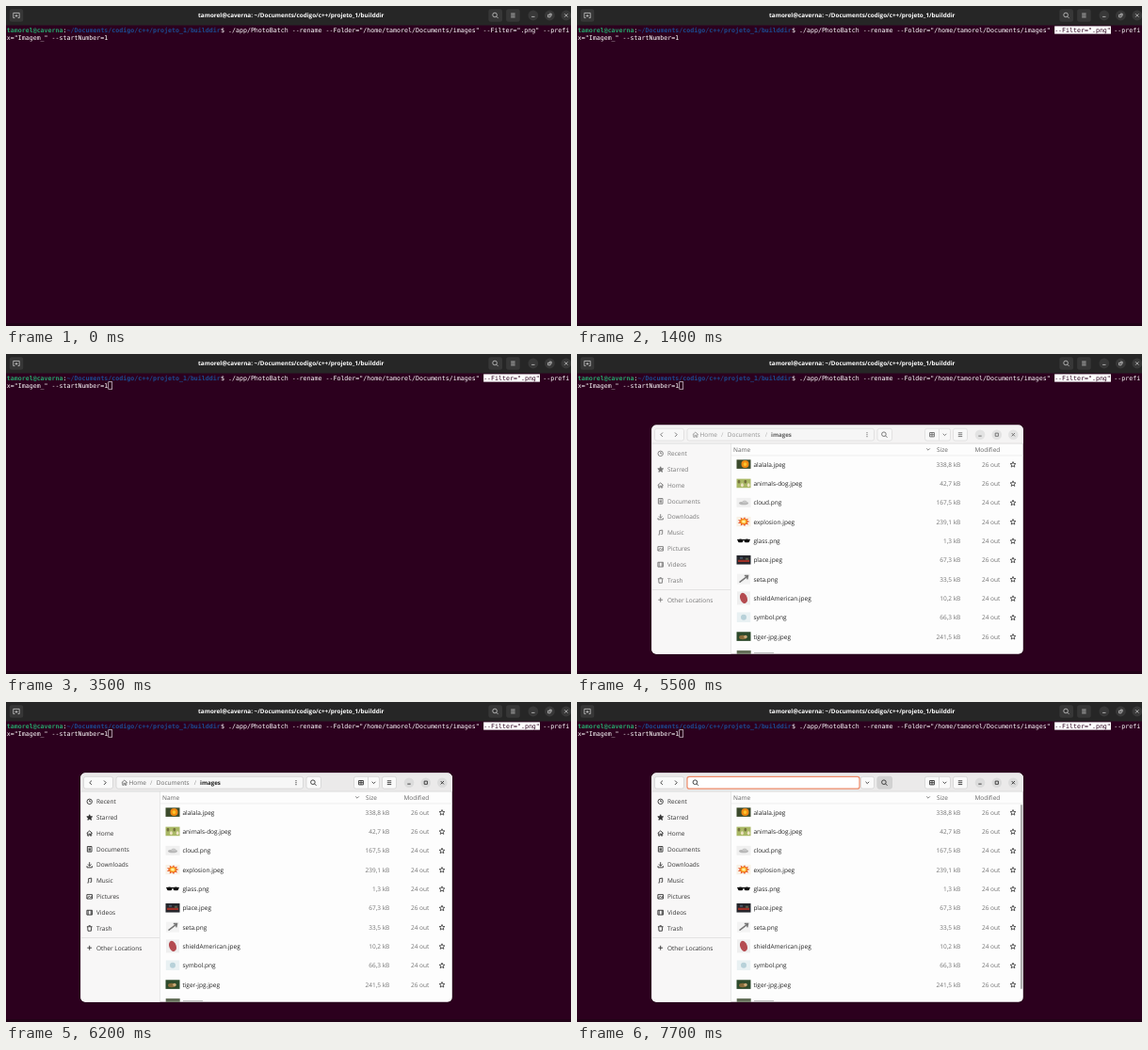
Write an HTML page that moves like this. It is 600x340 px and loops after 8000 ms.

```html
<!DOCTYPE html>
<html lang="pt">
<head>
<meta charset="utf-8">
<title>Terminal</title>
<style>
html, body { margin: 0; width: 100%; height: 100%; overflow: hidden; background: #2c001e; }
svg { display: block; }
text { white-space: pre; text-rendering: geometricPrecision; font: 6.5px "Open Sans", "Noto Sans", sans-serif; }
.mono { font: 6.623px "DejaVu Sans Mono", monospace; }
.bold { font-weight: 700; }
.line { fill: none; stroke: #333; stroke-width: .9; }
.light { stroke: #ddd; stroke-width: .7; }
</style>
</head>
<body>
<svg id="stage" width="600" height="340" viewBox="0 0 600 340"></svg>
<script>
const stage = document.getElementById('stage');
const CELL = 3.987, LEFT = 0.8, ROW = 20.33;
const LINE1 = 27.8, LINE2 = 35.8, PURPLE = '#2c001e';
const prompt = 'tamorel@caverna', cwd = '~/Documents/codigo/c++/projeto_1/builddir';
const flag = '--Filter=".png"';
const command = '$ ./app/PhotoBatch --rename --Folder="/home/tamorel/Documents/images" ';
const flagCol = prompt.length + 1 + cwd.length + command.length;
const col = n => LEFT + n * CELL;

const text = (x, y, s, fill = '#333', more = '') => `<text x="${x}" y="${y}" fill="${fill}" ${more}>${s}</text>`;
const mono = (n, y, s, fill, more = '') => text(col(n), y, s, fill, `class="mono ${more}"`);
const rect = (x, y, w, h, fill, r = 0, more = '') =>
  `<rect x="${x}" y="${y}" width="${w}" height="${h}" rx="${r}" fill="${fill}" ${more}/>`;
const disc = (x, y, r, fill) => `<circle cx="${x}" cy="${y}" r="${r}" fill="${fill}"/>`;
const oval = (x, y, rx, ry, fill) => `<ellipse cx="${x}" cy="${y}" rx="${rx}" ry="${ry}" fill="${fill}"/>`;
const path = (x, y, d, cls = '', more = '') => `<path transform="translate(${x} ${y})" class="line ${cls}" d="${d}" ${more}/>`;
const ring = r => `M${-r} 0a${r} ${r} 0 1 0 ${2 * r} 0a${r} ${r} 0 1 0 ${-2 * r} 0`;

const LENS = 'M-2.9 -.5a2.3 2.3 0 1 0 4.6 0a2.3 2.3 0 1 0 -4.6 0M1.1 1.2L3 3.1';
const MENU = 'M-2.2 -1.9h4.4M-2.2 0h4.4M-2.2 1.9h4.4';
const MIN = 'M-1.7 1.4h3.4', CLOSE = 'M-1.7 -1.7l3.4 3.4M1.7 -1.7l-3.4 3.4';
const MAX = 'M-1.6 -1.6h3.2v3.2h-3.2z', RESTORE = 'M-1.8 -.7h2.5v2.5h-2.5zM-.5 -1.8h2.3v2.3';
const DOWN = 'M-1.8 -.9L0 .9L1.8 -.9';
const STAR = 'M0 -2.9L.8 -.9L2.9 -.8L1.3 .6L1.8 2.7L0 1.5L-1.8 2.7L-1.3 .6L-2.9 -.8L-.8 -.9z';
const HOUSE = 'M-3 0L0 -2.6L3 0M-2 -.6v3.2h1.3v-2h1.4v2H2v-3.2';
const TAB = 'M-1.6 2.6h-1.6v-5.2h6.4v5.2h-1.6M0 -1v2.8M-1.4 .4h2.8';

const winButtons = (xs, y, r, fill, icons, cls = '') =>
  icons.map((d, i) => disc(xs[i], y, r, fill) + path(xs[i], y, d, cls)).join('');

function terminal() {
  const button = (x, d) => rect(x - 7.3, 3.3, 14.6, 13.4, '#373737', 2.5) + path(x, 10, d, 'light');
  return rect(0, 0, 600, 340, PURPLE) + rect(0, 337, 600, 3, '#210217') +
    rect(0, 0, 600, 20.5, '#262626') +
    button(11, TAB) + button(519.7, LENS) + button(538.4, MENU) +
    winButtons([559.8, 577.4, 594.8], 10, 5.4, '#383838', [MIN, RESTORE, CLOSE], 'light') +
    text(302.8, 12.2, `${prompt}: ${cwd}`, '#fff', 'text-anchor="middle" class="bold" style="font-size:6.33px"') +
    mono(0, LINE1, prompt, '#26a269', 'bold') + mono(prompt.length, LINE1, ':', '#fff') +
    mono(prompt.length + 1, LINE1, cwd, '#1c4a8f', 'bold') +
    mono(prompt.length + 1 + cwd.length, LINE1, command + flag + ' --prefi', '#fff') +
    mono(0, LINE2, 'x="Imagem_" --startNumber=1', '#fff') +
    rect(col(flagCol), 21.4, 0, 8.2, '#fff', 0, 'id="mark"') +
    mono(flagCol, LINE1, '<tspan id="picked"></tspan>', PURPLE) +
    rect(col(27), 29.4, 4.2, 8, '#fff', 0, 'id="block"') +
    rect(col(27) + .3, 29.7, 4, 7.5, 'none', 0, 'id="hollow" stroke="#fff" stroke-width=".6"');
}

const places = [
  ['Recent', ring(2.7) + 'M0 -1.6V0H1.5'],
  ['Starred', STAR],
  ['Home', HOUSE],
  ['Documents', 'M-2.3 -2.8h4.6v5.6h-4.6zM-1.2 -1.2h2.4M-1.2 .2h2.4M-1.2 1.5h2.4'],
  ['Downloads', 'M0 -3V1M-1.8 -.7L0 1.1L1.8 -.7M-2.7 1v1.7h5.4v-1.7'],
  ['Music', 'M-1 1.8v-4.2l3 -.5v4M-2.3 2h1.2M.7 1.5h1.2'],
  ['Pictures', 'M-2.8 -2.2h5.6v4.4h-5.6zM-2.4 1.8l2 -2.4l1.2 1.2l.8 -.8l1.2 1.8'],
  ['Videos', 'M-2.8 -2.4h5.6v4.8h-5.6zM-1.5 -2.4v4.8M1.5 -2.4v4.8'],
  ['Trash', 'M-2.8 -1.8h5.6M-1 -2.8h2M-2 -1.6l.3 4.3h3.4l.3 -4.3']
];

const scene = (bg, ...shapes) => rect(-7.5, -4.8, 15, 9.6, bg) + shapes.join('');
const burst = (r, fill) => {
  let d = '';
  for (let i = 0; i < 18; i++) {
    const k = i % 2 ? r * .6 : r, a = i * Math.PI / 9;
    d += `${i ? 'L' : 'M'}${(k * 1.3 * Math.cos(a)).toFixed(2)} ${(k * Math.sin(a)).toFixed(2)}`;
  }
  return `<path d="${d}z" fill="${fill}"/>`;
};
const files = [
  ['alalala.jpeg', '338,8 kB', 26, scene('#3c4b2c', disc(1.5, 0, 4, '#f08a12'), disc(1.5, 0, 1.9, '#fbc52c'))],
  ['animals-dog.jpeg', '42,7 kB', 26, scene('#a9b865',
    [-5, -1.6, 1.8, 5.2].map((x, i) => oval(x, i % 2 ? 1.8 : -1.8, 1.4, 1.9, i % 2 ? '#eee3c3' : '#75743f')).join(''))],
  ['cloud.png', '167,5 kB', 24, rect(-7.5, -5, 15, 10, '#f0f0f0') + oval(0, .7, 5, 1.8, '#b5b5b5') + oval(1, -.6, 2.6, 1.6, '#c6c6c6')],
  ['explosion.jpeg', '239,1 kB', 24, rect(-7.5, -5.2, 15, 10.4, '#f8f1e5') + burst(5, '#e5472c') + burst(3.8, '#f9a51c') + burst(2, '#fff1a0')],
  ['glass.png', '1,3 kB', 24, rect(-6.8, -1.5, 13.6, 1.1, '#111') + oval(-3.4, 0, 2.9, 1.9, '#111') + oval(3.4, 0, 2.9, 1.9, '#111')],
  ['place.jpeg', '67,3 kB', 26, scene('#25262c', rect(-6, 0, 12, 2.3, '#9c3027'), rect(-4, -3, 3, 2, '#465565'), rect(2, -2, 3, 2, '#596048'))],
  ['seta.png', '33,5 kB', 24, rect(-7, -5.5, 14, 11, '#f3f3f3') + path(0, 0, 'M-4.5 3.5L4 -3M.8 -3.5L4.5 -3.5L3.8 .3', '', 'style="stroke:#777;stroke-width:1.5"')],
  ['shieldAmerican.jpeg', '10,2 kB', 24, rect(-7, -7, 14, 14, '#efefef') + `<g transform="rotate(-20)">${oval(0, 0, 3.7, 5.8, '#b44b50')}</g>`],
  ['symbol.png', '66,3 kB', 24, rect(-7.2, -5.3, 14.4, 10.6, '#e9f1f3') + disc(0, 0, 3, '#b7d1d9')],
  ['tiger-jpg.jpeg', '241,5 kB', 26, scene('#2d4a2b', oval(-1, 1, 4, 2.2, '#8a6d3b'), disc(2, .4, 1.8, '#c9a878'))]
];

function sidebar() {
  return places.map(([name, d], i) => {
    const y = 105.8 + i * 16.84;
    return path(88.7, y, d, '', name === 'Starred' ? 'style="fill:#333"' : '') + text(96, y + 2.3, name);
  }).join('') + path(88.7, 261.2, 'M-2.4 0h4.8M0 -2.4v4.8') + text(96, 263.5, 'Other Locations');
}

function listing() {
  const grey = '#737373', end = 'text-anchor="end"';
  return text(166, 103.5, 'Name', '#666') + path(373, 101.3, DOWN, '', 'style="stroke:#777"') +
    text(382, 103.5, 'Size', '#666') + text(449.3, 103.5, 'Modified', '#666', end) +
    files.map(([name, size, day, thumb], i) => {
      const y = 117.4 + i * ROW;
      return `<g transform="translate(177 ${y - .3})">${thumb}</g>` + text(187.4, y + 2.3, name, '#222') +
        text(407.3, y + 2.3, size, grey, end) + text(449.3, y + 2.3, day + ' out', grey, end) +
        path(463, y, STAR, '', 'style="stroke-width:.8"');
    }).join('') + rect(169.7, 315, 15, 4, '#65705a') + rect(188, 317.2, 21, 1.2, '#b5b5b5');
}

function headerBar() {
  const box = (x, w, fill = '#fafafa', more = '') => rect(x, 79.3, w, 12.8, fill, 2.2, `stroke="#cfcfcf" stroke-width=".7" ${more}`);
  const y = 85.7;
  const crumbs = box(117, 198.5, '#f7f7f7') + path(125.8, y, HOUSE, '', 'style="stroke:#777"') +
    text(130.5, 88, 'Home', '#666') + text(153, 88, '/', '#999') + text(159.8, 88, 'Documents', '#666') +
    text(199.8, 88, '/', '#999') + text(206, 88, 'images', '#222', 'class="bold" style="font-size:6.2px"') +
    [-2, 0, 2].map(d => disc(308, y + d, .6, '#333')).join('');
  const search = rect(117, 79.3, 183, 12.8, '#fff', 2.2, 'stroke="#ee8a68" stroke-width="1.2"') +
    path(126, y, LENS) + box(301.5, 14) + path(308.3, y, DOWN) +
    rect(131.6, 81.6, .7, 8.2, '#222', 0, 'id="caret"');
  return box(82.5, 31) + path(90, y, 'M1 -2.2L-1.2 0L1 2.2') + path(105, y, 'M-1 -2.2L1.2 0L-1 2.2') +
    `<g id="crumbs">${crumbs}</g><g id="search">${search}</g>` +
    box(319, 15.5) + box(319, 15.5, '#d2d2d2', 'id="pressed"') + path(326.5, y, LENS) +
    box(369.5, 27) + path(377, y, 'M-2.4 -2.2h4.8v4.4h-4.8zM0 -2.2v4.4M-2.4 0h4.8') +
    path(384.5, y, 'M0 -6V6', '', 'style="stroke:#d5d5d5"') + path(390.5, y, DOWN) +
    box(399.5, 15) + path(407, y, MENU) + winButtons([428, 445.8, 463.3], y, 5.3, '#dcdcdc', [MIN, MAX, CLOSE]);
}

function fileWindow() {
  return `<clipPath id="frame">${rect(79.3, 75.5, 394.5, 243.3, '#fff', 5)}</clipPath>` +
    rect(78.7, 75.3, 395.7, 244.3, '#1a0313', 5.5, 'opacity=".5"') +
    `<g clip-path="url(#frame)">` + rect(79, 75, 396, 245, '#fdfdfd') +
    rect(79, 95, 84, 225, '#f8f7f7') + rect(163, 95, .7, 225, '#dedede') +
    rect(79, 75, 396, 20, '#f4f3f3') + rect(79, 75, 396, 20, '#ebeaea', 0, 'id="active"') +
    rect(79, 94.7, 396, .7, '#d3d3d3') + rect(163, 107.6, 312, .7, '#e6e6e6') + rect(79, 250.2, 84, .7, '#dcdcdc') +
    `<g id="side">${sidebar()}</g><g id="head">${headerBar()}</g>` + listing() +
    rect(471, 109, 1.8, 196, '#a5a5a5', .9, 'id="bar"') + '</g>';
}

stage.innerHTML = terminal() + `<g id="files">${fileWindow()}</g>`;

const el = id => document.getElementById(id);
const alpha = (id, v) => el(id).setAttribute('opacity', +v);
const ramp = (t, a, b) => Math.min(1, Math.max(0, (t - a) / (b - a)));

function draw(t) {
  const step = Math.floor(t / 100);
  const picked = Math.min(15, Math.max(0, (step - 4) * 3));
  el('mark').setAttribute('width', picked * CELL);
  el('picked').textContent = flag.slice(0, picked);
  alpha('block', t < 3500 && Math.floor(t / 600) % 2 === 1);
  alpha('hollow', t >= 3500);

  alpha('files', t >= 5500);
  const focus = ramp(t, 5500, 6000);
  alpha('active', focus);
  alpha('side', .65 + .35 * focus);
  alpha('head', .7 + .3 * focus);
  alpha('bar', ramp(t, 6300, 6600));
  alpha('pressed', ramp(t, 6800, 7000));
  const open = ramp(t, 6900, 7200);
  alpha('crumbs', 1 - open);
  alpha('search', open);
  alpha('caret', 1 - ramp(t, 7550, 7700));
}

function tick(now) {
  draw(now % 8000);
  requestAnimationFrame(tick);
}
requestAnimationFrame(tick);
</script>
</body>
</html>
```
